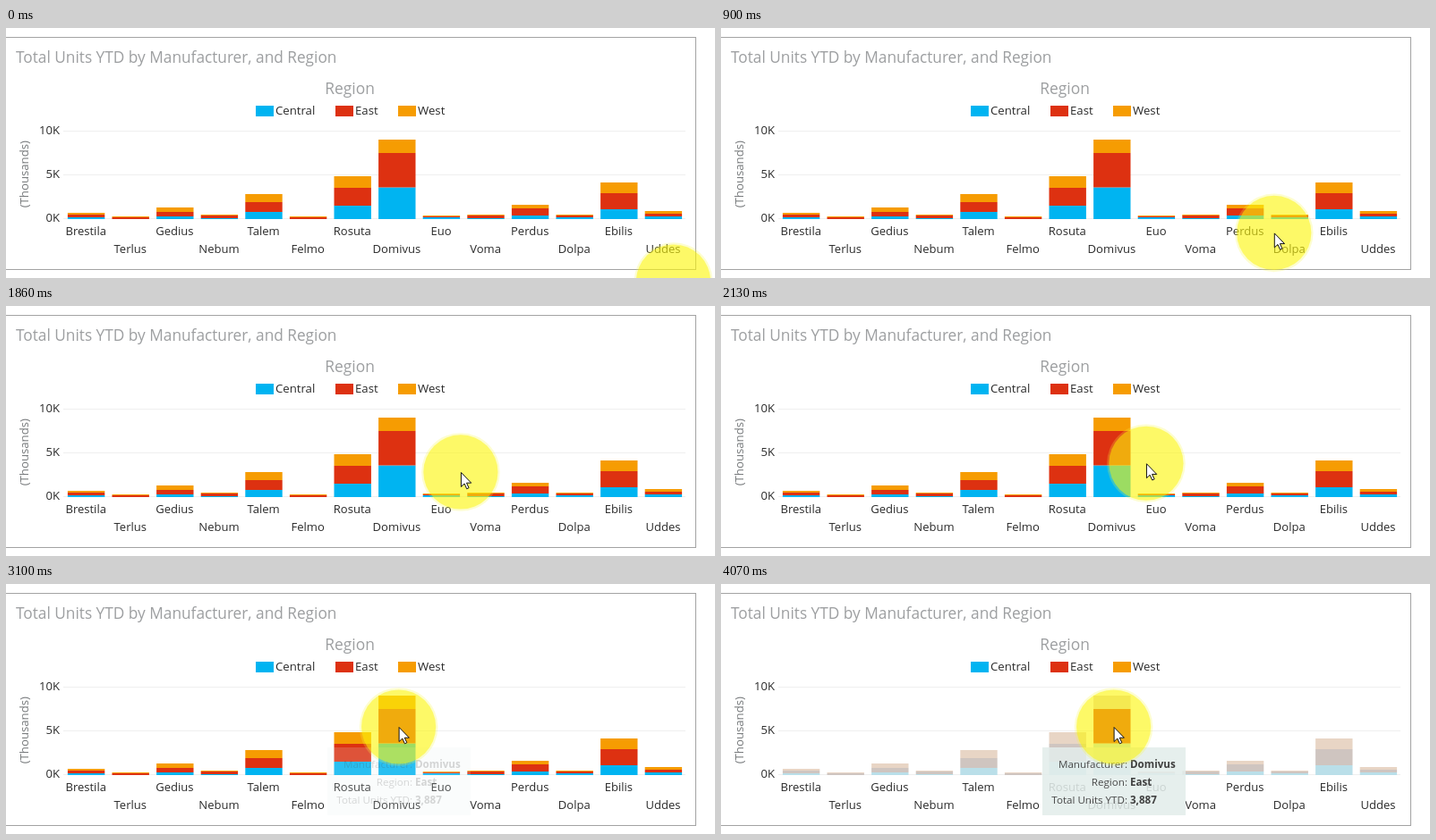
These frames come from a looping animation (792x280 px, 4.63 s). An HTML page with a canvas:

```html
<!DOCTYPE html>
<html lang="en">
<head>
<meta charset="utf-8">
<title>Units by manufacturer and region</title>
<style>
  html, body { margin: 0; width: 100%; height: 100%; overflow: hidden; background: #fff; }
  canvas { display: block; }
</style>
</head>
<body>
<canvas id="stage" width="792" height="280"></canvas>
<script>
const ctx = document.getElementById('stage').getContext('2d');
const LOOP = 4630;
const FONT = '"Open Sans", "Noto Sans", sans-serif';
const BASE = 214;

const REGIONS = [
  { name: 'Central', color: '#00b4f1', faded: '#badfe9', x: 279 },
  { name: 'East', color: '#dd3111', faded: '#cfc5c0', x: 368 },
  { name: 'West', color: '#f69c02', faded: '#e8d5c5', x: 438 }
];

// Name, then bar heights in px for Central, East, West
const MAKERS = [
  ['Brestila', 2, 3, 2], ['Terlus', 0, 2, 1], ['Gedius', 3, 5, 5],
  ['Nebum', 1, 3, 1], ['Talem', 8, 11, 9], ['Felmo', 0, 2, 1],
  ['Rosuta', 15, 20, 13], ['Domivus', 35.5, 38.5, 15], ['Euo', 2, 1, 1],
  ['Voma', 1, 3, 1], ['Perdus', 4, 8, 4], ['Dolpa', 2, 2, 1],
  ['Ebilis', 11, 18, 12], ['Uddes', 3, 3, 3]
];
const PICKED = 7;

// Pointer path: time, x, y
const PATH = [
  [375, 745.5, 284], [900, 618, 229.5], [1380, 530.5, 190], [1620, 530.5, 190],
  [1860, 508, 186], [2160, 471.5, 175], [2400, 445, 163], [2610, 438.6, 160]
];

const clamp = v => Math.max(0, Math.min(1, v));
const ramp = (t, from, to) => clamp((t - from) / (to - from));

function slope(i, axis) {
  const prev = PATH[i - 1], here = PATH[i], next = PATH[i + 1];
  if (!prev || !next || prev[1] === here[1] || next[1] === here[1]) return 0;
  return (next[axis] - prev[axis]) / (next[0] - prev[0]);
}

function pointerAt(t) {
  const last = PATH.length - 1;
  t = Math.max(PATH[0][0], Math.min(PATH[last][0], t));
  let i = 0;
  while (i < last - 1 && t > PATH[i + 1][0]) i++;
  const a = PATH[i], b = PATH[i + 1], span = b[0] - a[0];
  const p = (t - a[0]) / span, q = 1 - p;
  return [1, 2].map(k =>
    a[k] * (1 + 2 * p) * q * q + b[k] * p * p * (3 - 2 * p) +
    span * (slope(i, k) * p * q * q - slope(i + 1, k) * p * p * q));
}

function text(str, x, y, size, color, align = 'left', weight = 400) {
  ctx.font = `${weight} ${size}px ${FONT}`;
  ctx.fillStyle = color;
  ctx.textAlign = align;
  ctx.fillText(str, x, y);
}

function box(x, y, w, h, color) {
  ctx.fillStyle = color;
  ctx.fillRect(x, y, w, h);
}

function disc(r, color) {
  ctx.beginPath();
  ctx.arc(0, 0, r, 0, 2 * Math.PI);
  ctx.fillStyle = color;
  ctx.fill();
}

function drawFrame() {
  box(0, 0, 792, 280, '#fff');
  box(0, 10, 771, 1, '#a3a3a3');
  box(0, 270, 771, 1, '#a3a3a3');
  box(770, 10, 1, 261, '#a3a3a3');
  text('Total Units YTD by Manufacturer, and Region', 11, 39, 17.25, '#9d9fa1');
  text('Region', 384, 74, 17.4, '#9d9fa1', 'center');
  for (const r of REGIONS) {
    box(r.x, 87, 20, 12, r.color);
    text(r.name, r.x + 22, 97, 13.2, '#2b2b2b');
  }
  ['10K', '5K', '0K'].forEach((label, i) => {
    box(64, 115 + 49 * i, 695, 1, '#efefef');
    text(label, 60, 119 + 49 * i, 13.1, '#2b2b2b', 'right');
  });
  ctx.save();
  ctx.translate(24.5, 163.7);
  ctx.rotate(-Math.PI / 2);
  text('(Thousands)', 0, 0, 13.2, '#777a7c', 'center');
  ctx.restore();
}

function drawBars(fade) {
  MAKERS.forEach(([name, ...heights], i) => {
    const center = 89.6 + 49.6 * i, left = center - 20.7;
    let y = BASE;
    heights.forEach((h, k) => {
      const { color, faded } = REGIONS[k];
      y -= h;
      const keep = i === PICKED && k === 1 ? 1 : 1 - fade;
      if (keep < 1) box(left, y, 41.4, h, faded);
      ctx.globalAlpha = keep;
      box(left, y, 41.4, h, color);
      ctx.globalAlpha = 1;
    });
    text(name, center - 0.4, i % 2 ? 252 : 232, 13.05, '#2b2b2b', 'center');
  });
}

function drawTooltip(alpha) {
  if (!alpha) return;
  const rows = [['Manufacturer:', MAKERS[PICKED][0]], ['Region:', 'East'], ['Total Units YTD:', '3,887']];
  ctx.globalAlpha = alpha;
  box(359, 183, 160, 76, 'rgba(227, 237, 235, .87)');
  rows.forEach(([label, value], i) => {
    const y = 206 + 20 * i;
    text(label, 454, y, 11.6, '#484848', 'right');
    text(value, 457, y, 11.6, '#404040', 'left', 700);
  });
  ctx.globalAlpha = 1;
}

function drawClick(strength) {
  if (!strength) return;
  const r = 5 + 6 * strength;
  const glow = ctx.createRadialGradient(0, 0, 0, 0, 0, r);
  glow.addColorStop(0, '#ff9a00');
  glow.addColorStop(0.3, '#ff8000');
  glow.addColorStop(0.5, '#fa2a08');
  glow.addColorStop(0.68, '#fa3a08');
  glow.addColorStop(1, 'rgba(255, 120, 0, 0)');
  ctx.globalAlpha = strength;
  disc(r, glow);
  ctx.globalAlpha = 1;
}

const ARROW = new Path2D('M.5 .5V16.5L4.2 13L6.8 18.8L9.2 17.7L6.6 12.2H11.8Z');

function drawPointer(t) {
  ctx.save();
  ctx.translate(...pointerAt(t));
  disc(43.8, 'rgba(245, 245, 60, .24)');
  disc(41.6, 'rgba(253, 246, 0, .5)');
  drawClick(ramp(t, 3440, 3590) * (1 - ramp(t, 3620, 3800)));
  ctx.fillStyle = '#fff';
  ctx.fill(ARROW);
  ctx.lineWidth = 1;
  ctx.strokeStyle = '#111';
  ctx.stroke(ARROW);
  ctx.restore();
}

function draw(t) {
  drawFrame();
  drawBars(ramp(t, 3610, 4060));
  drawTooltip(ramp(t, 3010, 3450));
  drawPointer(t);
}

const start = performance.now();
function tick() {
  draw((performance.now() - start) % LOOP);
  requestAnimationFrame(tick);
}
tick();
</script>
</body>
</html>
```
